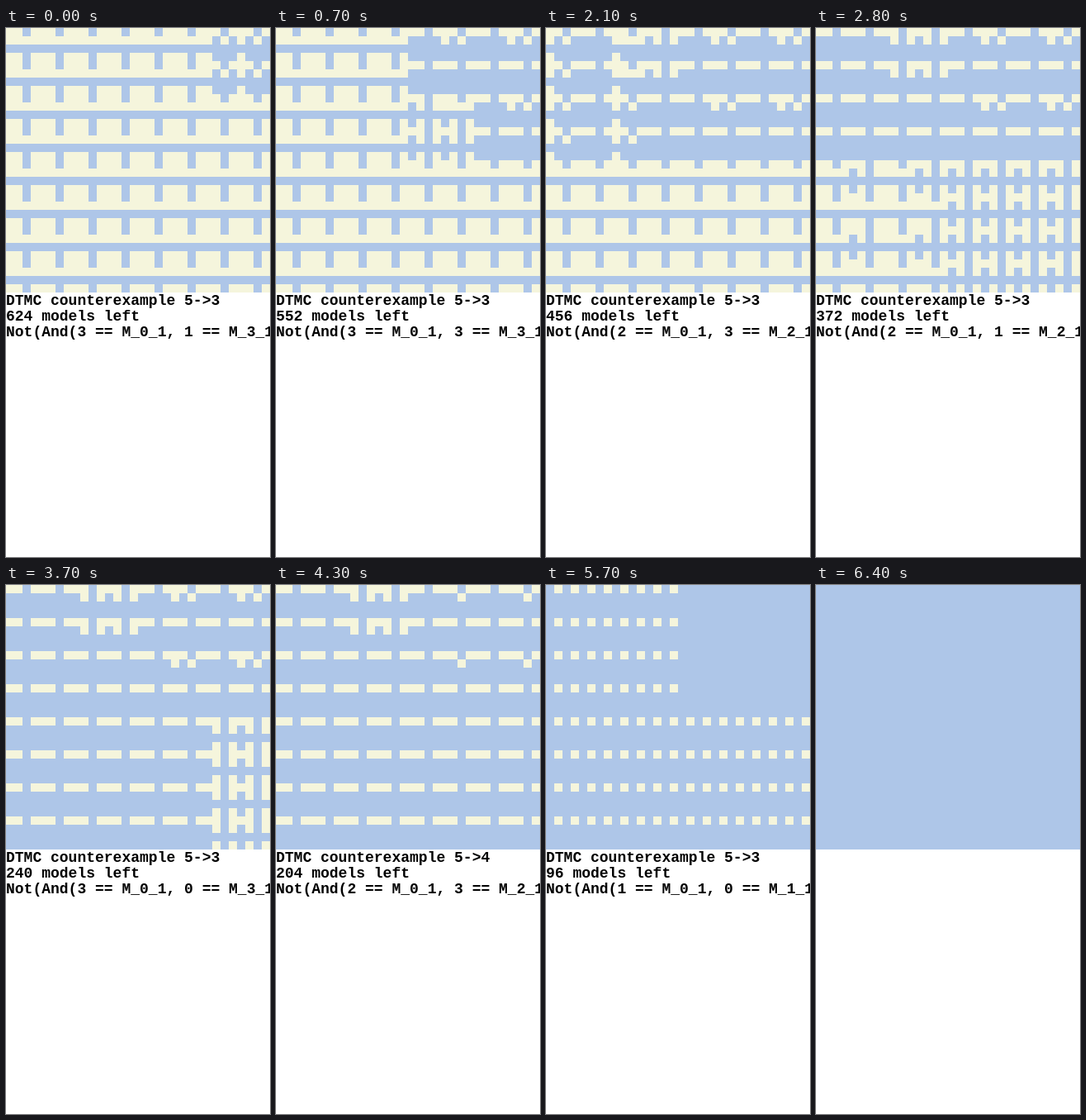
These frames come from a looping animation (320 by 640 pixels, 7.5 s). An HTML page with a canvas:

```html
<!DOCTYPE html>
<html lang="en">
<head>
<meta charset="utf-8">
<title>Counterexamples</title>
<style>
html, body { margin: 0; width: 100%; height: 100%; overflow: hidden; background: #fff; }
canvas, svg { position: absolute; left: 0; top: 0; }
text { font: bold 18px "Liberation Mono", "Courier New", monospace; }
</style>
</head>
<body>
<canvas width="320" height="320"></canvas>
<svg width="320" height="640"><text y="335"/><text y="354"/><text y="373"/></svg>
<script>
const SIZE = 32, CELL = 10, STEP = 100, LOOP = 7500;
const ctx = document.querySelector('canvas').getContext('2d');
const lines = document.querySelectorAll('text');

// One rule per step: the values of M_0 to M_4, a dot leaves a value free.
const rules = `
3..11 2.3.1 2.2.1 2.0.1 221.1 221.1
3..01 3..31 3..21 30.30 31.30 33.30 32.30 32.10
33.10 30.00 31.00 32.00 33.00 3..20 2.1.0 2.3.0
2.0.0 2.2.0 2.1.3 2.3.3 2.0.3 2.2.3 2.1.2 2.3.2
2.0.2 2.2.2 3..12 3..32 3..02 3..22 3..23 3..03
3..13 3..33 201.1 202.1 2.011 2.311 2.311
30.10 31.10 2.111 20.11 20.11
211.1 210.1 00..1 00..0 00..3 00..2 11..1 10..1
11..0 10..0 11..2 10..2 11..3 10..3`.trim().split(/\s+/);

const start = /^(0[123]|1[23]|23)/;

// Each model is a cell; M_i joins bit i of its column and row.
const cells = [];
for (let y = 0; y < SIZE; y++) {
  for (let x = 0; x < SIZE; x++) {
    const key = [0, 1, 2, 3, 4].map(i => (x >> i & 1) + 2 * (y >> i & 1)).join('');
    const end = start.test(key) ? 0 : rules.findIndex(r => new RegExp(r).test(key));
    cells.push({ x, y, end });
  }
}

function caption(step, left) {
  const rule = rules[step];
  if (!rule) return ['', '', ''];
  const terms = [...rule].map((v, i) => v === '.' ? '' : `${v} == M_${i}_1`).filter(Boolean);
  return [
    `DTMC counterexample 5->${terms.length}`,
    `${left} models left`,
    `Not(And(${terms.join(', ')}))`
  ];
}

function draw(step) {
  const open = cells.filter(c => c.end > step);
  ctx.fillStyle = '#aec6e8';
  ctx.fillRect(0, 0, 320, 320);
  ctx.fillStyle = '#f5f5dc';
  for (const c of open) ctx.fillRect(c.x * CELL, c.y * CELL, CELL, CELL);
  caption(step, open.length).forEach((s, i) => lines[i].textContent = s);
}

let shown = -1;
const t0 = performance.now();
function tick() {
  const step = Math.floor((performance.now() - t0) % LOOP / STEP);
  if (step !== shown) draw(shown = step);
  requestAnimationFrame(tick);
}
tick();
</script>
</body>
</html>
```
